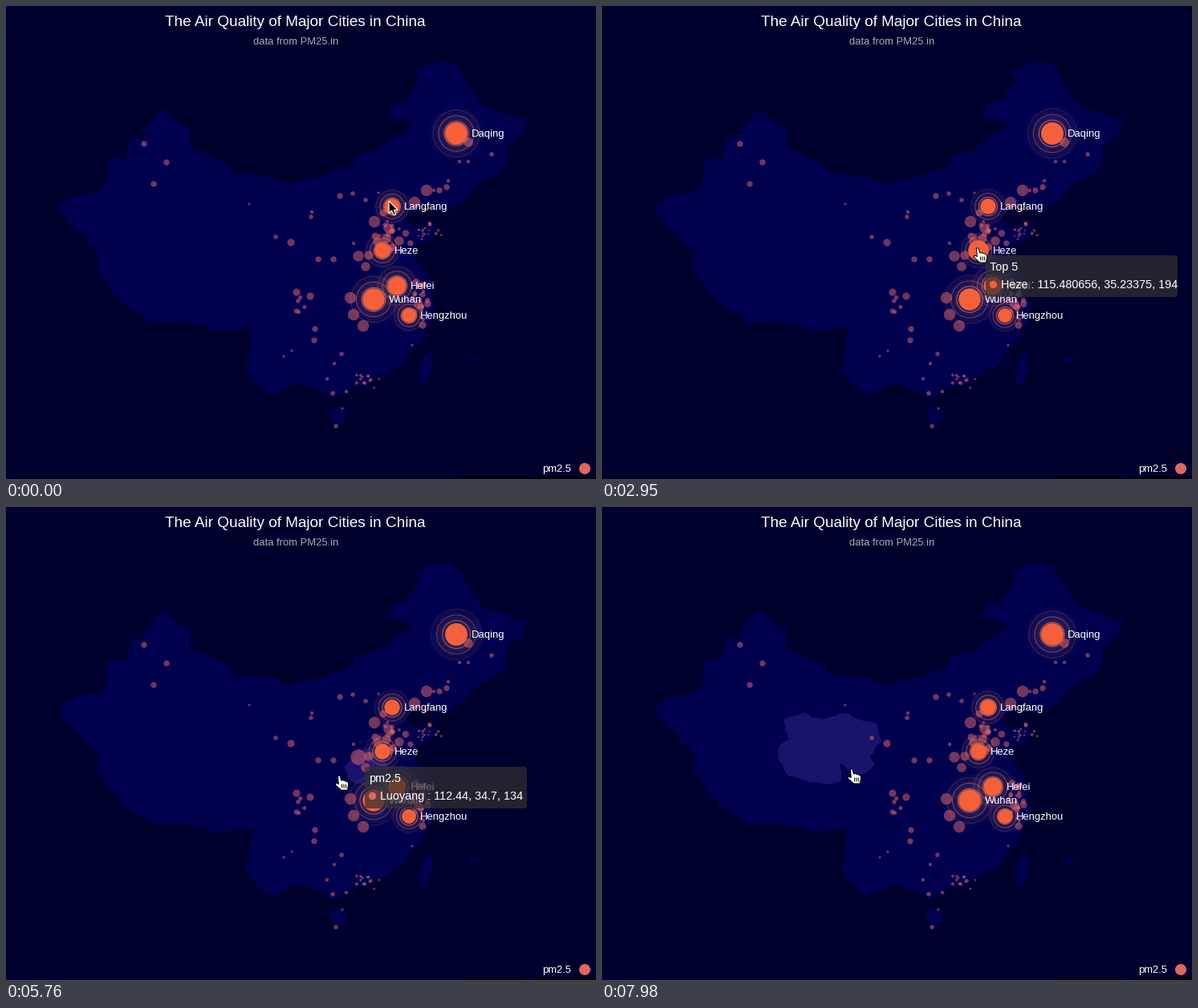
A matplotlib script for the animation above (8000 ms loop, 735 px wide and 590 px high).

```python
import numpy as np
import matplotlib.pyplot as plt
from matplotlib.animation import FuncAnimation
from matplotlib.collections import PatchCollection
from matplotlib.patches import Circle, Ellipse, FancyBboxPatch, Polygon

W, H, DPI = 735, 590, 100
LOOP, INTERVAL = 8000, 50
STEP = 7980 / 54          # the picture is refreshed at this pace, in ms
RIPPLE = 4000             # life of one ring, in ms

BG, LAND, HOVER = "#00002e", "#00004f", "#19136b"
CORE, DOT, GLOW = "#f4603a", "#e0686a", "#585070"

plt.rcParams["font.family"] = "Liberation Sans"
rng = np.random.default_rng(7)

fig = plt.figure(figsize=(W / DPI, H / DPI), dpi=DPI, facecolor=BG)
ax = fig.add_axes([0, 0, 1, 1])
ax.axis("off")


def px(size):
    return size * 72 / DPI


def text(x, y, s, size=13, color="white", ha="left", z=9, **kw):
    return ax.text(x, y, s, fontsize=px(size), color=color, ha=ha,
                   va="baseline", zorder=z, **kw)


def disc(x, y, r, color, z, **kw):
    return ax.add_patch(Circle((x, y), r, fc=color, ec="none", zorder=z, **kw))


def rough(pts, depth=3, amp=0.11):
    """Close an outline and roughen it by shifting segment middles sideways."""
    p = np.array(pts + pts[:1], float)
    for _ in range(depth):
        d = np.diff(p, axis=0)
        shift = rng.uniform(-amp, amp, len(d))[:, None]
        out = np.empty((2 * len(p) - 1, 2))
        out[::2] = p
        out[1::2] = (p[:-1] + p[1:]) / 2 + shift * d[:, ::-1] * [-1, 1]
        p = out
    return p


def area(pts, color=LAND, z=1):
    return ax.add_patch(Polygon(rough(pts), fc=color, ec="none", zorder=z))


# ---- land ----
area([(65, 252), (80, 238), (125, 222), (125, 193), (150, 190), (157, 162), (172, 165),
      (186, 138), (196, 128), (230, 152), (228, 176), (268, 192), (285, 210), (350, 221),
      (400, 211), (434, 197), (433, 187), (482, 164), (508, 148), (472, 138), (480, 122),
      (498, 120), (516, 95), (511, 82), (545, 70), (560, 73), (591, 122), (637, 141),
      (655, 136), (640, 165), (624, 172), (624, 198), (595, 218), (535, 258), (534, 243),
      (494, 265), (506, 275), (538, 276), (506, 305), (522, 330), (534, 373), (520, 416),
      (495, 447), (455, 470), (408, 490), (372, 472), (330, 485), (298, 450), (308, 402),
      (262, 406), (180, 396), (135, 360), (112, 325), (118, 312), (80, 272)])
for x, y, w, h, tilt in [(523, 453, 14, 42, 14), (414, 511, 20, 22, 0)]:
    ax.add_patch(Ellipse((x, y), w, h, angle=tilt, fc=LAND, ec="none", zorder=1))

# inset of the southern islands
area([(572, 438), (603, 437), (580, 447)], "#000049")
ax.plot([572, 572], [446, 520], color="#000038", lw=px(1), zorder=1)
for x, y in [(612, 440), (622, 437), (620, 466)]:
    disc(x, y, 2, "#000049", 1)

# ---- provinces that light up: polygon, from, to ----
henan = [(421, 325), (440, 303), (452, 300), (476, 322), (475, 352), (465, 358), (425, 338)]
shaanxi = [(418, 254), (426, 249), (421, 280), (423, 318), (427, 328), (420, 338),
           (406, 346), (377, 340), (380, 328), (404, 308), (389, 292), (406, 270)]
qinghai = [(226, 265), (251, 256), (275, 265), (298, 257), (342, 270), (348, 293),
           (334, 312), (340, 322), (318, 337), (297, 320), (299, 340), (277, 346),
           (232, 336), (219, 315), (222, 297), (233, 290)]
provinces = [(area(henan, HOVER, 1.5), 5400, 5880),
             (area(shaanxi, HOVER, 1.5), 5880, 7330),
             (area(qinghai, HOVER, 1.5), 7600, LOOP)]

# ---- plain dots, by radius ----
dots = {
    7.2: [(445, 399), (433, 385), (429, 364), (459, 269), (509, 245), (524, 230)],
    5.8: [(490, 293), (448, 325), (476, 277), (463, 294), (576, 170), (514, 372)],
    4.6: [(470, 258), (355, 295), (379, 362), (519, 398), (362, 357)],
    3.7: [(172, 172), (200, 195), (184, 222), (389, 316), (408, 316), (385, 403),
          (384, 417), (416, 237), (540, 230), (549, 226)],
    2.8: [(336, 288), (432, 234), (448, 242), (605, 185), (418, 434), (407, 483),
          (411, 524), (528, 272), (380, 263)],
    2.2: [(565, 194), (576, 194), (533, 230), (433, 296), (409, 446), (400, 465),
          (424, 481), (551, 218), (523, 254), (381, 257)],
    1.6: [(303, 247), (419, 502), (346, 437), (356, 430), (506, 423), (464, 233)],
}
# dense areas: centre, spread, count, smallest and largest radius
clusters = [(449, 465, 8, 5, 14, 1.3, 2.3), (522, 281, 8, 5, 16, 1, 2),
            (482, 284, 11, 9, 16, 1.5, 4.6), (517, 370, 5, 15, 22, 1.2, 4.4),
            (368, 376, 7, 7, 5, 2.5, 3.2)]
circles = [Circle(p, r) for r, pts in dots.items() for p in pts]
for x, y, sx, sy, n, lo, hi in clusters:
    for p in rng.normal((x, y), (sx, sy), (n, 2)):
        circles.append(Circle(p, rng.uniform(lo, hi)))
ax.add_collection(PatchCollection(circles, fc=DOT, ec="none", alpha=0.52, zorder=4))

# dots that react to the pointer
live = []
for name, x, y, v in [("Liaocheng", 474, 290, 116), ("Zhengzhou", 452, 311, 113),
                      ("Luoyang", 439, 312, 134)]:
    r = v / 20
    tag = text(x + r + 5, y + 4, name, z=4.5, alpha=0.45)
    live.append((name, r, disc(x, y, r, DOT, 4, alpha=0.52), tag))

# ---- main cities with ripples ----
cities = [("Daqing", 561, 159, 279), ("Langfang", 481, 250, 193),
          ("Heze", 469, 305, 194), ("Hefei", 487, 349, 229),
          ("Wuhan", 458, 366, 273), ("Hengzhou", 502, 386, 177)]

yy, xx = np.mgrid[0:H, 0:W] + 0.5
clear = np.ones((H, W))
marks = []
for name, x, y, v in cities:
    r = v / 20
    d = np.hypot(xx - x, yy - y) / r
    clear *= 1 - 0.42 * np.clip((2.7 - d) / 1.7, 0, 1) ** 1.2
    rings = [ax.add_patch(Circle((x, y), r, fill=False, ec=CORE, lw=px(1), zorder=5))
             for _ in range(3)]
    marks.append((name, x, r, rings, disc(x, y, r, CORE, 6), text(x + r + 5, y + 4, name, z=7)))

glow = np.empty((H, W, 4))
glow[:] = plt.matplotlib.colors.to_rgba(GLOW)
glow[..., 3] = 1 - clear
ax.imshow(glow, extent=(0, W, H, 0), zorder=3, aspect="auto", interpolation="nearest")

# ---- titles and legend ----
text(360.5, 25, "The Air Quality of Major Cities in China", 19, ha="center")
text(361, 48.5, "data from PM25.in", 13, "#aaaaaa", ha="center")
text(668, 580.5, "pm2.5")
disc(721, 577, 7, "#e0675f", 9)


def rounded(x, y, w, h, color, z, **kw):
    return ax.add_patch(FancyBboxPatch((x, y), w, h, fc=color, ec="none", zorder=z,
                                       boxstyle="round,pad=0,rounding_size=4", **kw))


for x in (566, 658):
    rounded(x, 587, 80, 10, "black", 9)

# ---- tooltip: start time, title, line, width, resting place ----
tips = [(290, "Top 5", "Langfang : 116.7, 39.53, 193", 205, (490, 257)),
        (1450, "pm2.5", "Liaocheng : 115.97, 36.45, 116", 223, (488, 283)),
        (2200, "Top 5", "Heze : 115.480656, 35.23375, 194", 239, (478, 311)),
        (3800, "pm2.5", "Zhengzhou : 113.65, 34.76, 113", 225, (459, 321)),
        (4280, "pm2.5", "Luoyang : 112.44, 34.7, 134", 202, (447, 324))]
TIPS_END = 5880
box = rounded(0, 0, 200, 52, "#323232", 10, alpha=0.72)
bullet = disc(0, 0, 4.7, DOT, 11)
head = text(0, 0, "", 14.4, z=11)
body = text(0, 0, "", 14.4, z=11)

# ---- pointer ----
arrow_pts = np.array([(0, 0), (0, 15.5), (3.5, 12.3), (6, 18), (8.6, 17), (6.2, 11.4),
                      (11, 11.2)])
hand_pts = np.array([(-1.5, 0), (1, 0), (1.8, 6), (4, 5.6), (9.6, 7.8), (10.3, 10), (8, 18),
                     (0, 18), (-6.5, 11), (-5, 9), (-2.2, 10.6)])
hand_pts[:, 0] += 0.14 * hand_pts[:, 1]
arrow = ax.add_patch(Polygon(arrow_pts, fc="black", ec="white", lw=px(1.2), zorder=13))
hand = ax.add_patch(Polygon(hand_pts, fc="white", ec="black", lw=px(1), joinstyle="round",
                            zorder=13))
folds = [ax.plot([], [], color="black", lw=px(1), zorder=14)[0] for _ in range(3)]

# time, x, y
path = np.array([(0, 477, 243), (300, 479, 248), (1180, 479, 249), (1480, 474, 287),
                 (1780, 473, 291), (2050, 468, 302), (3650, 468, 302), (3860, 450, 312),
                 (4200, 438, 315), (5300, 437, 315), (5760, 415, 335), (5910, 411, 340),
                 (7080, 409, 340), (7980, 311, 327)])


def draw_tip(t):
    """Place the tooltip and return the name it belongs to."""
    k = sum(tip[0] <= t for tip in tips) - 1
    shown = k >= 0 and t < TIPS_END
    for part in (box, bullet, head, body):
        part.set_visible(shown)
    if not shown:
        return None
    start, title, line, width, goal = tips[k]
    came = tips[max(k - 1, 0)][4]
    left = 1 - min((t - start) / 400, 1)
    x, y = np.array(goal) + (np.array(came) - goal) * left ** 3
    x = min(x, 720 - width)
    box.set_bounds(x, y, width, 52)
    bullet.center = x + 9.5, y + 36.5
    bullet.set_facecolor(CORE if title == "Top 5" else DOT)
    head.set_text(title)
    head.set_position((x + 5, y + 19))
    body.set_text(line)
    body.set_position((x + 19, y + 40.5))
    return line.split(" : ")[0]


def draw_pointer(t):
    x, y = (np.interp(t, path[:, 0], path[:, c]) for c in (1, 2))
    is_arrow = t < 290
    arrow.set_visible(is_arrow)
    arrow.set_xy(arrow_pts + [x, y])
    hand.set_visible(not is_arrow)
    hand.set_xy(hand_pts + [x, y])
    for i, fold in enumerate(folds):
        fold.set_visible(not is_arrow)
        fx = x + 3.4 + 2.4 * i
        fold.set_data([fx, fx + 0.5], [y + 11, y + 15])


def update(i):
    t = int((i * INTERVAL + 30) / STEP) * STEP
    active = draw_tip(t)
    draw_pointer(t)
    for name, x, r, rings, core, tag in marks:
        grow = 3 if name == active else 0
        core.set_radius(r + grow)
        tag.set_x(x + r + 5 + grow)
        for n, ring in enumerate(rings):
            p = (t / RIPPLE + 0.057 + n / 3) % 1
            ring.set_radius(r * (1 + 1.5 * p))
            ring.set_alpha(0.95 * (1 - p))
    for name, r, dot, tag in live:
        dot.set_radius(r + 3 if name == active else r)
        tag.set_visible(name == active and t < 5400)
    for shape, on, off in provinces:
        shape.set_visible(on <= t < off)
    return []


ax.set_xlim(0, W)
ax.set_ylim(H, 0)
anim = FuncAnimation(fig, update, frames=LOOP // INTERVAL, interval=INTERVAL,
                     repeat=True, repeat_delay=0, blit=False)
plt.show()
```
